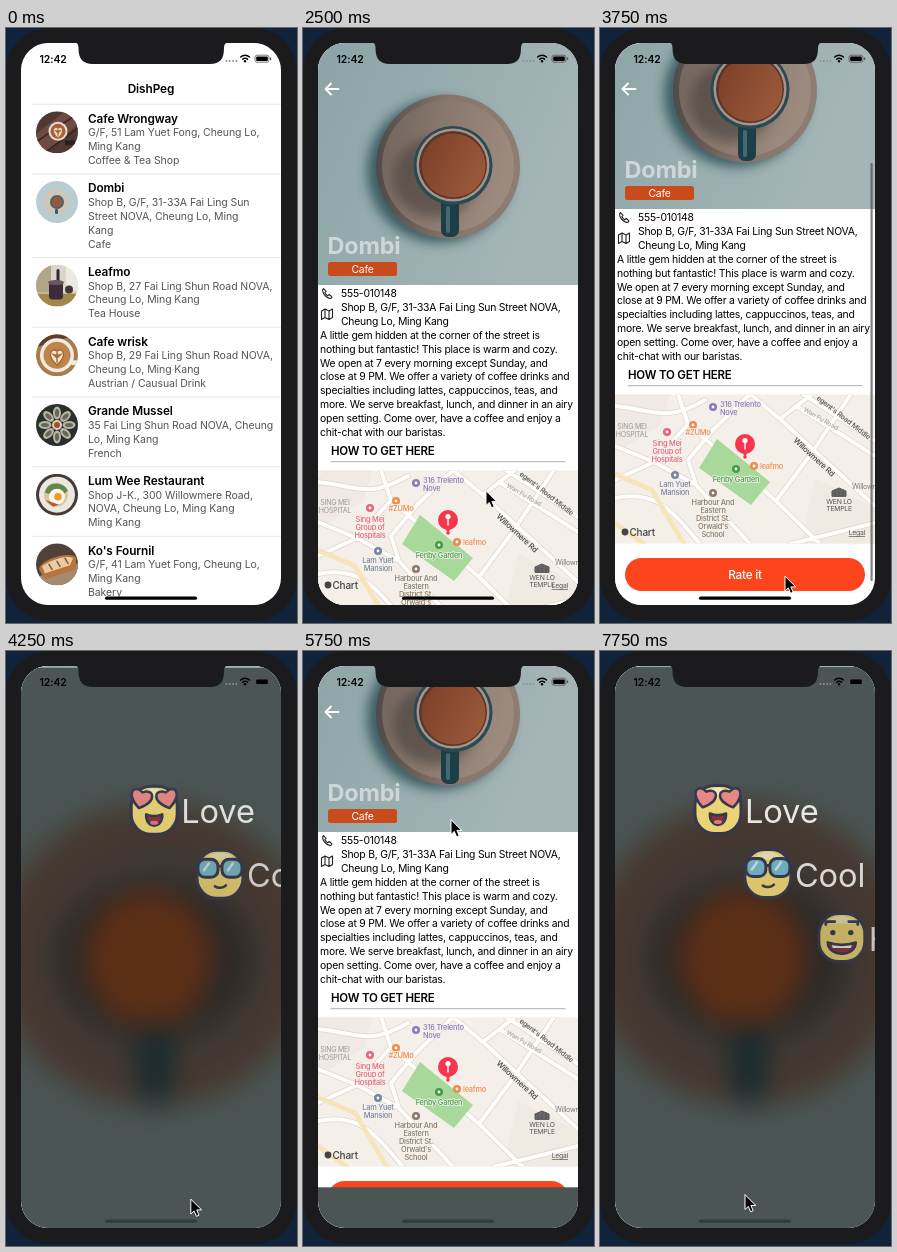
An HTML page that plays this animation: 291 by 595 pixels, repeating every 8000 ms.

```html
<!DOCTYPE html>
<html lang="en">
<head>
<meta charset="utf-8">
<title>Restaurant app</title>
<style>
  html, body { margin: 0; width: 100%; height: 100%; overflow: hidden; background: #10233b; }
  svg { display: block; font-family: Inter, "Open Sans", sans-serif; letter-spacing: -.005em; }
  #detail { letter-spacing: -.014em; }
</style>
</head>
<body>
<svg id="stage" width="291" height="595" viewBox="0 0 291 595"></svg>
<script>
const LOOP = 8000, STEP = 250, SCREEN_W = 260, SCREEN_H = 562;
const PRESENT = [3817, 7284], DISMISS = 5515, PUSH = 1700;

// ---- markup helpers ----
const text = (x, y, lines, { size = 10.4, weight = 400, fill = '#000', anchor = 'start', pitch = 13.9, extra = '' } = {}) =>
  lines.split('|').map((line, i) =>
    `<text x="${x}" y="${y + i * pitch}" font-size="${size}" font-weight="${weight}" fill="${fill}" text-anchor="${anchor}" ${extra}>${line}</text>`).join('');
const circle = (x, y, r, fill, extra = '') => `<circle cx="${x}" cy="${y}" r="${r}" fill="${fill}" ${extra}/>`;
const ellipse = (x, y, rx, ry, fill, extra = '') => `<ellipse cx="${x}" cy="${y}" rx="${rx}" ry="${ry}" fill="${fill}" ${extra}/>`;
const rect = (x, y, w, h, fill, rx = 0, extra = '') => `<rect x="${x}" y="${y}" width="${w}" height="${h}" rx="${rx}" fill="${fill}" ${extra}/>`;
const path = (d, fill, stroke = 'none', width = 1, extra = '') =>
  `<path d="${d}" fill="${fill}" stroke="${stroke}" stroke-width="${width}" stroke-linecap="round" stroke-linejoin="round" ${extra}/>`;
const line = (d, stroke, width) => path(d, 'none', stroke, width);
const group = (x, y, body, extra = '') => `<g transform="translate(${x} ${y})" ${extra}>${body}</g>`;
const gradient = (id, direction, ...colors) => `<linearGradient id="${id}" ${direction}>`
  + colors.map((c, i) => `<stop offset="${i / (colors.length - 1)}" stop-color="${c}"/>`).join('') + '</linearGradient>';

// ---- restaurant list ----
const around = (n, draw) => Array.from({ length: n }, (_, i) => draw(i * 360 / n)).join('');
const leaf = path('M0 7C-8 0-4-6 0-3C4-6 8 0 0 7M0 5V-2M-3-1 0 2 3-1', '#f4e6cf', '#a9652f', 1);
const thumbs = [
  rect(-21, -21, 42, 42, '#513832') + path('M-21 2 8-21H21V-8L-12 21H-21Z', '#6e4b42') + line('M-20 9 18-17M-12 20 21-4', '#38241f', 1.5)
    + circle(1, -1, 9.5, '#e8ddd4') + circle(1, -1, 7.5, '#a65f3c') + group(1, -1, leaf, 'opacity=".9"') + rect(8, 8, 10, 5, '#2b2021'),
  rect(-21, -21, 42, 42, '#b9cdd1') + circle(-1, 0, 12.5, '#cfc5b9') + circle(0, 0, 7, '#47636a') + circle(0, 0, 5.3, '#96583b') + rect(-2, 7, 3, 5, '#3b5b64', 1),
  rect(-21, -21, 42, 42, '#d9d5c9') + rect(-21, -21, 15, 28, '#b3a589') + rect(9, -21, 12, 26, '#ece9e1') + rect(-21, 8, 42, 13, '#a2874a')
    + rect(-8, -3, 14, 17, '#3c2b3a', 3) + line('M1-15V-3', '#332a31', 3) + ellipse(-1, -3, 8, 2.5, '#6b5360') + circle(12, 4, 4, '#42363a'),
  rect(-21, -21, 42, 42, '#a87b50') + path('M-21-8 21-21V-21H-21Z', '#5b3e2b') + circle(0, 0, 17, '#f1eae0') + circle(0, 0, 13.5, '#bd8549')
    + `<g transform="scale(1.4)">${leaf}</g>` + rect(14, 5, 7, 5, '#f1eae0', 2),
  rect(-21, -21, 42, 42, '#28302d') + around(8, a => ellipse(0, -12, 4, 6.5, '#b9b4a4', `transform="rotate(${a})"`) + ellipse(0, -12, 2, 4, '#66675c', `transform="rotate(${a})"`))
    + circle(0, 0, 5, '#d9d2bd') + circle(0, 0, 3, '#a94832'),
  rect(-21, -21, 42, 42, '#443a36') + circle(0, 0, 18, '#ebe8e2') + circle(-1, 0, 12, '#d6c7a4') + path('M-12-2C-10-14 6-14 11-4L3 2Z', '#62884b')
    + circle(0, 2, 8, '#f9f5eb') + circle(1, 2, 3.8, '#ed9c2d') + path('M-12 5 -4 12 2 10', '#bc5438'),
  rect(-21, -21, 42, 42, '#50423b') + path('M-21 13 21-1V21H-21Z', '#a58a70') + path('M-18 5C-18-4 12-14 19-7V5L-12 15Z', '#b9743d')
    + path('M-15 2C-7-4 10-10 16-6L13 1-12 9Z', '#e9cda2') + line('M-8 0-5 5M0-3 3 2M8-6 11-1', '#94562b', 1.6)
];
const restaurants = [
  ['Cafe Wrongway', 'G/F, 51 Lam Yuet Fong, Cheung Lo,|Ming Kang|Coffee &amp; Tea Shop'],
  ['Dombi', 'Shop B, G/F, 31-33A Fai Ling Sun|Street NOVA, Cheung Lo, Ming|Kang|Cafe'],
  ['Leafmo', 'Shop B, 27 Fai Ling Shun Road NOVA,|Cheung Lo, Ming Kang|Tea House'],
  ['Cafe wrisk', 'Shop B, 29 Fai Ling Shun Road NOVA,|Cheung Lo, Ming Kang|Austrian / Causual Drink'],
  ['Grande Mussel', '35 Fai Ling Shun Road NOVA, Cheung|Lo, Ming Kang|French'],
  ['Lum Wee Restaurant', 'Shop J-K., 300 Willowmere Road,|NOVA, Cheung Lo, Ming Kang|Ming Kang'],
  ["Ko's Fournil", 'G/F, 41 Lam Yuet Fong, Cheung Lo,|Ming Kang|Bakery']
];
function listScreen() {
  let top = 76, rows = '';
  restaurants.forEach(([name, details], i) => {
    rows += line(`M26 ${top + .3}H275`, '#e2e2e4', .8)
      + group(51, top + 28.3, `<g clip-path="url(#thumb)">${thumbs[i]}</g>`)
      + text(82, top + 18.6, name, { size: 11.8, weight: 600 })
      + text(82, top + 32.2, details, { fill: '#555', size: 10.5 });
    top += 27.9 + 13.93 * details.split('|').length;
  });
  return rect(15, 15, SCREEN_W, SCREEN_H, '#fff') + rows
    + text(145, 65, 'DishPeg', { size: 11.8, weight: 600, anchor: 'middle' });
}

// ---- detail ----
const header = rect(15, 15, 260, 242, 'url(#table)')
  + circle(136, 143, 72, '#264b53', 'opacity=".8" filter="url(#soft)"')
  + circle(145, 138.5, 72, 'url(#saucer)') + circle(145, 138, 66, 'url(#saucerInner)')
  + ellipse(132, 150, 42, 40, '#3f3a37', 'opacity=".55" filter="url(#soft)"')
  + rect(138, 168, 18, 41, '#1d3d47', 7) + rect(143, 178, 4, 27, '#436a73', 2)
  + circle(150, 137.5, 39.5, '#274a53') + circle(150, 137, 36.5, '#a8938a') + circle(150, 137, 34, '#56362a') + circle(150.5, 137.5, 32, 'url(#coffee)')
  + text(24.5, 226, 'Dombi', { size: 23.5, weight: 700, fill: '#cfd6d7' })
  + rect(25, 234, 69, 14, '#c94a1b', 2.5) + text(59.5, 244.8, 'Cafe', { fill: '#fff', anchor: 'middle' });

const poi = (x, y, color, label, labelX, labelY, anchor = 'middle') =>
  circle(x, y, 4, color) + circle(x, y, 1.4, '#fff')
  + text(labelX, labelY, label, { size: 7.4, weight: 500, fill: color, anchor, pitch: 8, extra: 'stroke="#f5f1ea" stroke-width="1.6" paint-order="stroke"' });
const street = (x, y, angle, name, fill, size = 7.4) =>
  group(x, y, text(0, 0, name, { size, weight: 500, fill, extra: `transform="rotate(${angle})"` }));

const roads = [
  'M150 366 180 391 275 478', 'M203 366 275 413', 'M180 391 212 366', 'M196 378 275 428', 'M213 423 251 366',
  'M15 378C55 382 65 395 105 372', 'M78 366 88 396 54 434 15 452', 'M88 396 176 473 220 516', 'M54 434 96 457 150 516',
  'M15 470C55 462 70 480 100 516', 'M176 473 208 430', 'M96 457 88 432 113 402 150 366', 'M15 418 54 434', 'M190 516 275 495'
].join('');
const map = `<g clip-path="url(#mapArea)">` + rect(15, 366, 260, 150, '#f4f0e9')
  + path('M15 366H70L60 398 15 425Z', '#f0e9e4') + path('M215 450 275 480V516H200Z', '#efebe2')
  + line(roads, '#dcd7ce', 5.5) + line(roads, '#fffefc', 4)
  + line('M15 446 52 462 84 516M15 495 44 516', '#f6e5bb', 5)
  + path('M117 411 170 454 151 477 99 440Z', '#a8d99a')
  + street(216, 371, 38, "egent's Road Middle", '#555', 7.2) + street(203, 383, 30, 'Wan Fu Road', '#aaa', 6.6)
  + street(193, 413, 43, 'Willowmere Rd', '#444', 7.8) + text(252, 461, 'Willowm', { size: 7, fill: '#777' })
  + text(32, 401, 'SING MEI|HOSPITAL', { size: 7, fill: '#999', anchor: 'middle', pitch: 8 })
  + poi(113, 379, '#9178bd', '316 Trelento|Nove', 120, 379, 'start')
  + poi(93, 397, '#ef8b4c', '#ZUMo', 98, 407)
  + poi(67, 404, '#e4677c', 'Sing Mei|Group of|Hospitals', 67, 418)
  + poi(75, 447, '#7985a0', 'Lam Yuet|Mansion', 75, 459)
  + poi(136, 441, '#459b49', 'Fenby Garden', 136, 454)
  + poi(154, 438, '#ef8b4c', 'leafmo', 160, 441, 'start')
  + poi(113, 465, '#8b7a6a', "Harbour And|Eastern|District St.|Orwald's|School", 113, 477)
  + path('M232 468V463L239 460 246 463V468ZM235 464V468M239 464V468M243 464V468', '#666', '#555', 1)
  + text(239, 476, 'WEN LO|TEMPLE', { size: 6.8, fill: '#555', anchor: 'middle', pitch: 7.2 })
  + circle(145, 416, 10, '#f7364d') + circle(145, 429, 1.8, '#f7364d') + path('M142 424 145 429 148 424Z', '#f7364d')
  + circle(145, 412.5, 2.6, '#fff') + line('M145 414V421', '#fff', 1.4)
  + `<g id="mapNote">` + circle(25, 504, 3.4, '#444') + text(29.5, 508, 'Chart', { size: 10, weight: 500, fill: '#444' })
  + text(265, 507, 'Legal', { size: 6.8, fill: '#555', anchor: 'end', extra: 'text-decoration="underline"' }) + `</g></g>`;

const detail = rect(15, 15, SCREEN_W, SCREEN_H, '#fff')
  + `<g id="scroll">` + header
  + path('M20.5 260.5C18.5 262 20 266 23 268.5S28.5 271 29 268.8L26.3 266.5 24.7 267.8C23.5 267 22.5 266 21.8 264.8L23 263.3Z', 'none', '#222', 1.1)
  + path('M18.5 283 22 281 26 283 29.5 281V289.5L26 291.5 22 289.5 18.5 291.5ZM22 281V289.5M26 283V291.5', 'none', '#222', 1.1)
  + text(38, 268.6, '555-010148')
  + text(38, 282.8, 'Shop B, G/F, 31-33A Fai Ling Sun Street NOVA,|Cheung Lo, Ming Kang')
  + text(17, 310.7, 'A little gem hidden at the corner of the street is|nothing but fantastic! This place is warm and cozy.|We open at 7 every morning except Sunday, and|close at 9 PM. We offer a variety of coffee drinks and|specialties including lattes, cappuccinos, teas, and|more. We serve breakfast, lunch, and dinner in an airy|open setting. Come over, have a coffee and enjoy a|chit-chat with our baristas.')
  + text(28, 427.3, 'HOW TO GET HERE', { size: 11.5, weight: 600 }) + line('M28 433.7H262', '#999', .8)
  + group(0, 76, map)
  + rect(25, 606, 240, 33, '#fc441d', 16.5) + text(145, 627, 'Rate it', { size: 11.8, weight: 500, fill: '#fff', anchor: 'middle' })
  + `</g>` + line('M35.5 61H23M28 55.5 22.5 61 28 66.5', '#fff', 1.8)
  + rect(270.5, 135, 2.2, 418, '#555', 1, 'id="bar" opacity=".75"');

// ---- rating sheet ----
const INK = '#343950';
const heart = x => path('M0 10C-17-1-10-13 0-6C10-13 17-1 0 10Z', '#ef8b88', INK, 2.4, `transform="translate(${x} -12) rotate(${-x})"`);
const lens = x => rect(x, -15, 20, 18, '#79bfd3', 7, `stroke="${INK}" stroke-width="3"`) + line(`M${x + 6}-4 ${x + 11}-11`, '#d5eef2', 2.5);
const dots = circle(-9, -5, 2.7, INK) + circle(9, -5, 2.7, INK);
const grin = path('M-14 5C-5 8 5 8 14 5C13 20-13 20-14 5Z', '#8d3340', INK, 2.6) + path('M-10 7.5C-4 9 4 9 10 7.5L9 10.5H-9Z', '#fff');
const ratings = [
  ['Love', heart(-13) + heart(13) + path('M-8 4C-3 6 3 6 8 4C9 19-9 19-8 4Z', '#8d3340', INK, 2.6) + ellipse(0, 12.5, 4, 2, '#ec7880')],
  ['Cool', line('M-25-8H25', INK, 3) + lens(-22) + lens(2) + line('M-5 12C-2 14 3 14 6 11', INK, 2.6)],
  ['Happy', line('M-16-13V-16H-7M16-13V-16H7', INK, 2.8) + dots + grin],
  ['Sad', line('M-15-11-7-15M15-11 7-15M-8 14C-5 8 5 8 8 14', INK, 2.6) + dots],
  ['Angry', line('M-15-15-6-10M15-15 6-10M-8 13C-5 8 5 8 8 13', INK, 2.8) + dots]
];
const sheet = rect(15, 15, SCREEN_W, SCREEN_H, '#4a5554') + `<g filter="url(#blur)">`
  + ellipse(148, 302, 158, 152, '#46382f') + ellipse(148, 306, 112, 114, '#3f3934') + ellipse(148, 306, 98, 82, '#2a2928')
  + rect(133, 372, 32, 78, '#14292e', 10) + ellipse(143, 306, 64, 68, '#5c2e16') + `</g>`
  + ratings.map(([name, face], i) => `<g class="rating">` + group(88, 157.5 + 64 * i,
      rect(-23, -24, 46, 48, '#f3dc78', 20, `stroke="${INK}" stroke-width="3"`) + path('M-16-14C-8-24 8-24 16-14Z', '#f9edbb') + face
      + text(27, 13, name, { size: 32.6, fill: '#f0f0ee' })) + `</g>`).join('');

// ---- phone ----
const statusBar = text(33.5, 34.6, '12:42', { size: 10.4, weight: 600 })
  + [0, 3.3, 6.6, 9.9].map(x => circle(220.5 + x, 33, 1, '#8a8f90')).join('')
  + line('M234.7 29C237 26.7 241 26.7 243.5 29M236.7 31.2C238 30 240 30 241.5 31.2', '#000', 1.5) + circle(239, 33.2, 1.2, '#000')
  + rect(249, 27.2, 14, 7, 'none', 2, 'stroke="#555" stroke-width=".8"') + rect(250.2, 28.4, 11.6, 4.6, '#000', 1) + rect(264, 29.5, 1.2, 2.5, '#555');

const stage = document.getElementById('stage');
stage.innerHTML = `<defs>
  <clipPath id="screen">${rect(15, 15, SCREEN_W, SCREEN_H, '#000', 27)}</clipPath>
  <clipPath id="thumb">${circle(0, 0, 21, '#000')}</clipPath>
  <clipPath id="mapArea">${rect(15, 366.5, 260, 149, '#000')}</clipPath>
  ${gradient('table', 'x2="1" y2=".4"', '#8ba4a7', '#a5b5b6')}
  ${gradient('saucer', 'x2="1" y2="0"', '#4f4b48', '#85756b', '#8d7d73')}
  ${gradient('saucerInner', 'x2="1" y2=".3"', '#6f625a', '#8a796e', '#9c8a7e')}
  ${gradient('coffee', 'x2="1" y2=".5"', '#7a3f26', '#99573a')}
  <filter id="soft" x="-30%" y="-30%" width="160%" height="160%"><feGaussianBlur stdDeviation="6"/></filter>
  <filter id="blur" x="-20%" y="-20%" width="140%" height="140%" color-interpolation-filters="sRGB"><feGaussianBlur stdDeviation="14"/></filter>
</defs>`
  + rect(0, 0, 291, 593, '#1b1b1d', 43)
  + `<g clip-path="url(#screen)"><g id="list">${listScreen()}</g><g id="detail">${detail}</g><g id="sheet">${sheet}</g>${statusBar}`
  + rect(99, 568.6, 92, 3.2, '#000', 1.6, 'id="home"') + `</g>`
  + path('M66 14C71 14 72.5 16 72.5 20C72.5 31 77 36 87 36H204C214 36 218 31 218 20C218 16 220 14 225 14Z', '#1b1b1d')
  + `<g id="cursor">` + path('M0 0V14.5L3.3 11.4 5.6 16.8 8.2 15.7 5.9 10.4H10.4Z', '#000', '#fff', 1) + `</g>`;

// ---- motion ----
const el = id => document.getElementById(id);
const [list, detailView, scroller, bar, mapNote, sheetView, home, cursor] =
  ['list', 'detail', 'scroll', 'bar', 'mapNote', 'sheet', 'home', 'cursor'].map(el);
const ratingViews = [...document.querySelectorAll('.rating')];
const move = (node, x, y) => node.setAttribute('transform', `translate(${x} ${y})`);
const show = (node, on) => node.setAttribute('visibility', on ? 'visible' : 'hidden');
const clamp = v => Math.min(1, Math.max(0, v));
const smooth = v => { const p = clamp(v); return p * p * (3 - 2 * p); };

// Remaining distance (1 to 0) of a critically damped spring.
const spring = t => t <= 0 ? 1 : (1 + .01826 * t) * Math.exp(-.01826 * t);

const pointer = [
  [750, 230, 300], [1000, 196, 186], [1250, 196, 186], [1500, 188, 170], [2000, 188, 170], [2500, 183, 463],
  [2750, 183, 463], [3400, 185, 390], [3750, 185, 548.5], [5000, 184.5, 548.5], [5500, 148, 169],
  [6250, 148, 169], [7000, 145, 544], [LOOP, 145, 544]
];
function pointerAt(t) {
  const i = Math.max(1, pointer.findIndex(k => k[0] >= t));
  const [t0, x0, y0] = pointer[i - 1], [t1, x1, y1] = pointer[i];
  const s = smooth((t - t0) / (t1 - t0));
  return [x0 + (x1 - x0) * s, y0 + (y1 - y0) * s];
}

function render(t) {
  const away = spring(t - PUSH);
  move(detailView, SCREEN_W * away, 0);
  move(list, -.3 * SCREEN_W * (1 - away), 0);

  const scrolled = 76 * smooth((t - 2750) / 650);
  move(scroller, 0, -scrolled);
  move(mapNote, 0, Math.min(0, scrolled - 23));
  show(bar, t > 2750 && t < 4000);

  const start = t < PRESENT[1] ? PRESENT[0] : PRESENT[1];
  const closing = t >= DISMISS && t < PRESENT[1];
  const offset = SCREEN_H * (closing ? 1 - spring(t - DISMISS) : spring(t - start));
  move(sheetView, 0, offset);
  home.setAttribute('fill', offset < SCREEN_H - 6 ? '#333b3b' : '#000');
  ratingViews.forEach((view, i) => {
    const left = Math.max(0, start + 545 + 50 * i - t), dx = .0048 * left * left;
    move(view, dx, 0);
    view.setAttribute('opacity', clamp(1 - dx / 600));
  });

  show(cursor, t >= pointer[0][0]);
  move(cursor, ...pointerAt(t));
}

function tick() {
  render(Math.floor(performance.now() % LOOP / STEP) * STEP);
  requestAnimationFrame(tick);
}
tick();
</script>
</body>
</html>
```
